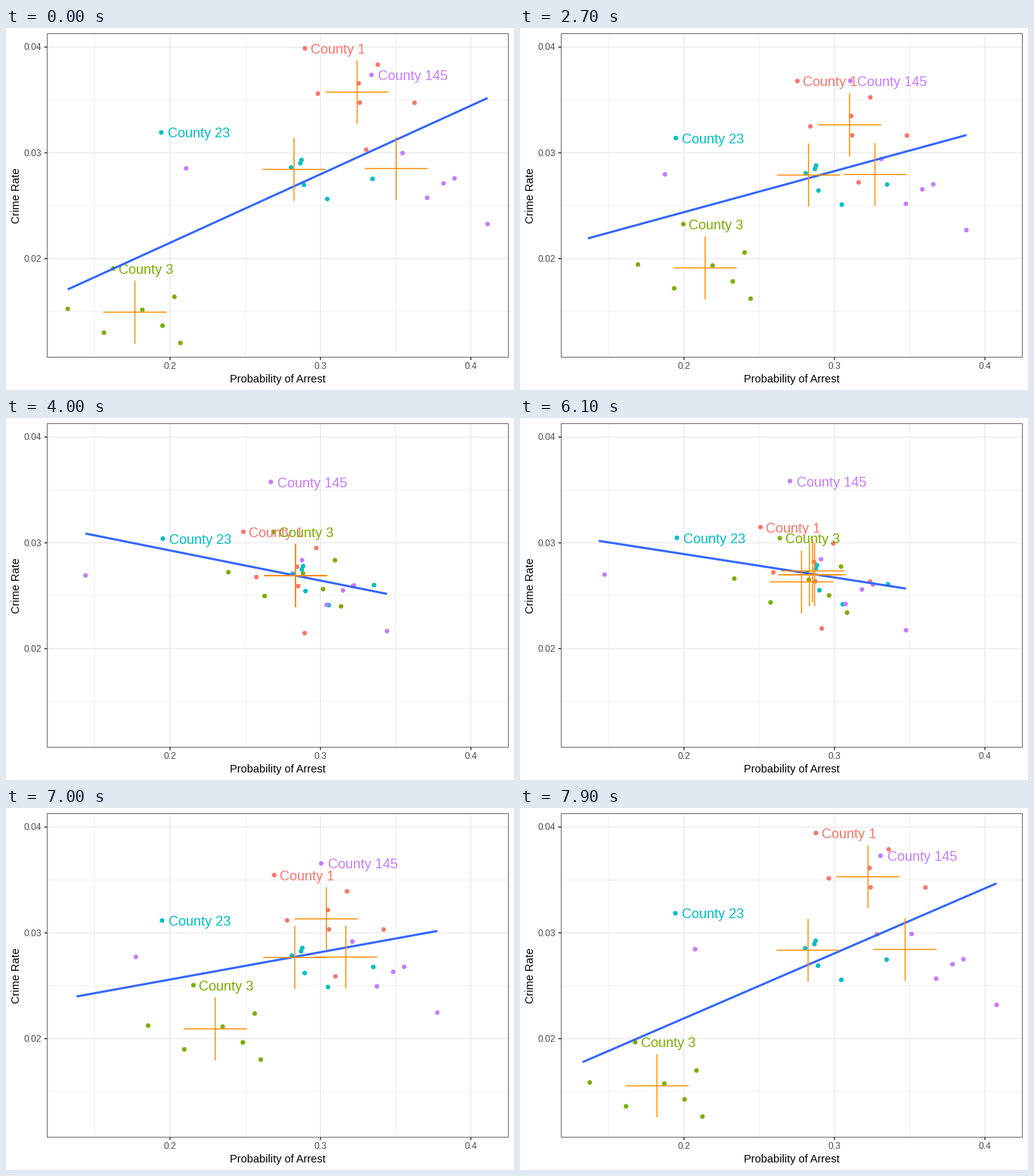
Animation, 672 px wide and 480 px high, one loop 8000 ms. Source, as a matplotlib script:

```python
import matplotlib.pyplot as plt
import numpy as np
from matplotlib.animation import FuncAnimation
from matplotlib.patches import Rectangle

W, H, DPI = 672, 480, 96
FRAMES, INTERVAL = 80, 100
PX = 72 / DPI  # points per pixel
LEFT, RIGHT, TOP, BOTTOM = 54.5, 664.5, 7.5, 436.5
ARM = 41.8

plt.rcParams["font.family"] = "Liberation Sans"

# Seven yearly observations: arrests in percent, crimes per thousand people.
COUNTIES = {
    "County 1": ("#F8766D",
                 [28.97, 33.81, 33.04, 36.25, 32.54, 32.61, 29.83],
                 [39.88, 38.34, 30.30, 34.73, 36.57, 34.75, 35.60]),
    "County 3": ("#7CAE00",
                 [20.29, 16.22, 18.16, 19.50, 20.69, 15.61, 13.20],
                 [16.39, 19.07, 15.15, 13.66, 12.03, 13.00, 15.25]),
    "County 23": ("#00BFC4",
                  [19.42, 28.74, 28.66, 28.05, 28.90, 33.46, 30.45],
                  [31.93, 29.33, 29.02, 28.61, 26.97, 27.54, 25.64]),
    "County 145": ("#C77CFF",
                   [33.39, 35.46, 38.91, 38.18, 37.09, 41.11, 21.07],
                   [37.37, 29.98, 27.59, 27.12, 25.75, 23.27, 28.53]),
}


def to_px(arrest, crime):
    return np.stack([217 + 19.9 * (np.asarray(arrest) - 20),
                     25.3 + 14.025 * (40 - np.asarray(crime))], axis=-1)


def fit_ends(points):
    """End points of the least-squares line through all points."""
    x, y = points.reshape(-1, 2).T
    ends = np.array([x.min(), x.max()])
    return np.stack([ends, np.polyval(np.polyfit(x, y, 1), ends)])


colors = [color for color, _, _ in COUNTIES.values()]
raw = np.array([to_px(arrest, crime) for _, arrest, crime in COUNTIES.values()])
means = raw.mean(axis=1, keepdims=True)
to_center = means.mean(axis=0) - means
worst_year = raw[:, :, 1].argmin(axis=1)
raw_fit, centered_fit = fit_ends(raw), fit_ends(raw + to_center)

fig = plt.figure(figsize=(W / DPI, H / DPI), dpi=DPI, facecolor="white")
ax = fig.add_axes([0, 0, 1, 1])
ax.set_xlim(0, W)
ax.set_ylim(H, 0)
ax.axis("off")


def stroke(xs, ys, color, width, z):
    return ax.plot(xs, ys, color=color, lw=width * PX, zorder=z, snap=False,
                   solid_capstyle="butt")[0]


def write(x, y, text, color, size, **kw):
    return ax.text(x, y, text, color=color, fontsize=size * PX, zorder=3,
                   va="baseline", **kw)


def draw_panel():
    for i in range(3):
        x, y = to_px(20 + 10 * i, 40 - 10 * i)
        for offset, width in ((0, 1.42), (1, 0.71)):
            gx, gy = x - 99.5 * offset, y + 70.1 * offset
            stroke([gx, gx], [TOP, BOTTOM], "#EBEBEB", width, 0)
            stroke([LEFT, RIGHT], [gy, gy], "#EBEBEB", width, 0)
        stroke([x, x], [BOTTOM, BOTTOM + 3.8], "#333333", 1.42, 7)
        stroke([LEFT - 3.8, LEFT], [y, y], "#333333", 1.42, 7)
        write(x, 452, f"0.{i + 2}", "#4D4D4D", 12, ha="center")
        write(46.8, y + 4, f"0.0{4 - i}", "#4D4D4D", 12, ha="right")
    ax.add_patch(Rectangle((LEFT, TOP), RIGHT - LEFT, BOTTOM - TOP, fill=False,
                           ec="#333333", lw=0.71 * PX, snap=False, zorder=8))
    write(359.6, 470, "Probability of Arrest", "black", 14.5, ha="center")
    write(18, 222, "Crime Rate", "black", 14.5, ha="center", rotation=90,
          rotation_mode="anchor")


draw_panel()
dots = ax.scatter(*raw.reshape(-1, 2).T, s=(6.16 * PX) ** 2, linewidths=0,
                  c=np.repeat(colors, raw.shape[1]), snap=False, zorder=2)
labels = [write(0, 0, name, color, 18.1, ha="left")
          for name, color in zip(COUNTIES, colors)]
fit = stroke([], [], "#3366FF", 2.85, 4)
crosses = [[stroke([], [], "#FF8C00", 1.42, 6) for _ in range(2)]
           for _ in COUNTIES]


def centering(frame):
    """0 for raw data, 1 for centered data; each hold and ramp lasts 2 s."""
    return float(np.interp(frame, [20, 40, 60, 80], [0, 1, 1, 0]))


def update(frame):
    s = centering(frame)
    points = raw + s * to_center
    dots.set_offsets(points.reshape(-1, 2))
    fit.set_data(*(raw_fit + s * (centered_fit - raw_fit)))
    for group, top, label, cross in zip(points, worst_year, labels, crosses):
        x, y = group[top]
        label.set_position((x + 0.9 * len(label.get_text()), y + 6.9))
        cx, cy = group.mean(axis=0)
        cross[0].set_data([cx, cx], [cy - ARM, cy + ARM])
        cross[1].set_data([cx - ARM, cx + ARM], [cy, cy])
    return []


anim = FuncAnimation(fig, update, frames=FRAMES, interval=INTERVAL,
                     repeat=True, repeat_delay=0)
plt.show()
```
